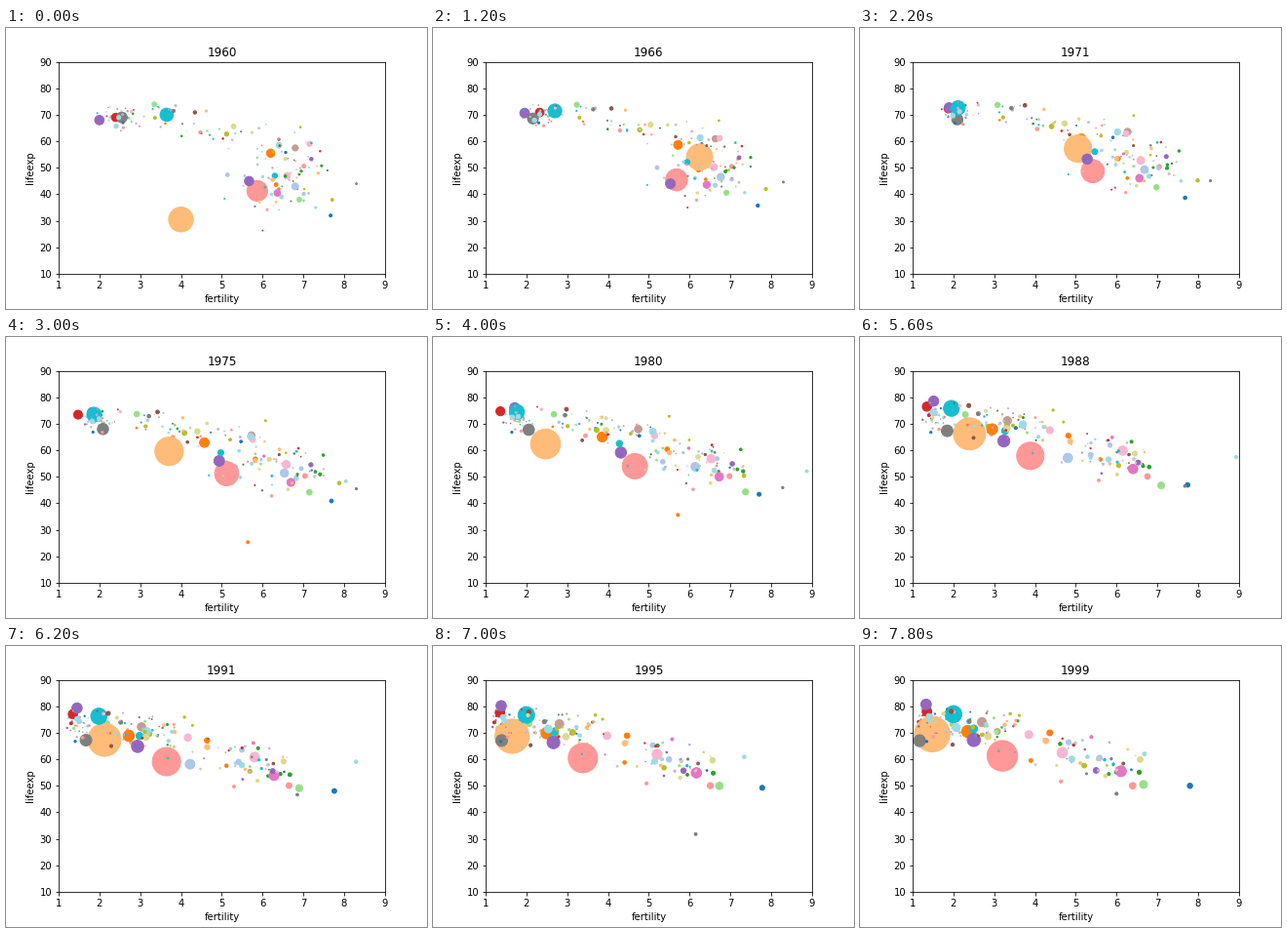
Write a matplotlib script that moves like this. It is 432 px wide and 288 px high and loops after 8000 ms.

```python
import numpy as np
import matplotlib.pyplot as plt
from matplotlib.animation import FuncAnimation

FIRST, LAST = 1960, 1999
YEARS = np.arange(FIRST, LAST + 1)
T = (YEARS - FIRST) / (LAST - FIRST)

(BLUE, LBLUE, ORANGE, LORANGE, GREEN, LGREEN, RED, LRED, PURPLE, LPURPLE,
 BROWN, LBROWN, PINK, LPINK, GRAY, LGRAY, OLIVE, LOLIVE, CYAN, LCYAN) = range(20)

rng = np.random.default_rng(5)
tracks = []  # (colour index, fertility, life expectancy, population in millions)


def bump(year, height, width):
    """A passing rise, or with a negative height a passing dip."""
    return height * np.exp(-((YEARS - year) / width) ** 2 / 2)


def s_curve(start, end, mid, pace):
    s = 1 / (1 + np.exp((mid - YEARS) / pace))
    return start + (end - start) * (s - s[0]) / (s[-1] - s[0])


def ease_out(start, end):
    return start + (end - start) * (1 - (1 - T) ** 1.4)


def country(color, pop, fert, mid, life, pace=8, fert_bump=0, life_bump=0):
    """Fertility falls around the year mid; fertile countries grow faster."""
    growth = 0.7 + 0.33 * np.mean(fert)
    tracks.append((color, s_curve(*fert, mid, pace) + fert_bump,
                   ease_out(*life) + life_bump, pop * growth ** T))


def small_pop(cap):
    return min(np.exp(rng.normal(0.5, 1.5)), cap)


def rich_countries(count):
    for _ in range(count):
        fert = max(rng.normal(2.5, 0.3), 1.95), max(rng.normal(1.5, 0.25), 1.15)
        life = rng.normal(69.5, 2.2), min(rng.normal(75, 3.5), 79)
        country(rng.integers(20), small_pop(50), fert, rng.uniform(1966, 1980), life)


def emerging_countries(count):
    for _ in range(count):
        start = rng.uniform(3.2, 7)
        fert = start, rng.uniform(1.7, 3.6)
        life = 75 - 3.4 * (start - 2) + rng.normal(0, 4), rng.normal(72, 3)
        country(rng.integers(20), small_pop(25), fert, rng.uniform(1972, 1986), life)


def poor_countries(count):
    for _ in range(count):
        end = rng.uniform(2.8, 6.6)
        fert = rng.normal(6.6, 0.55), end
        life = rng.normal(45, 7), 73 - 4.6 * (end - 2.5) + rng.normal(0, 5)
        country(rng.integers(20), small_pop(15), fert, rng.uniform(1982, 1994), life,
                pace=6, fert_bump=bump(1976, rng.normal(0.1, 0.4), 8))


rich_countries(20)
emerging_countries(22)
poor_countries(28)

# Afghanistan, Bangladesh, Brazil, Cambodia
country(BLUE, 9, (7.67, 7.8), 1990, (32, 50))
country(LBLUE, 50, (6.8, 3.2), 1988, (43, 60), pace=5)
country(ORANGE, 72, (6.2, 2.35), 1976, (55.5, 70.5))
country(ORANGE, 6, (6.4, 3.9), 1992, (42, 59.5), pace=4,
        fert_bump=bump(1977, -0.9, 3), life_bump=bump(1977, -34, 2.6))
# China
country(LORANGE, 645, (6.8, 1.46), 1973.5, (50, 69.5), pace=4,
        fert_bump=bump(1988, 0.8, 4) + bump(1960, -2.8, 1),
        life_bump=bump(1960, -19.5, 1.5))
# Ethiopia, Germany, India, Indonesia, Japan
country(LGREEN, 22, (6.9, 6.65), 1985, (38, 50.5),
        fert_bump=bump(1982, 0.6, 6), life_bump=bump(1984, -12, 2))
country(RED, 73, (2.4, 1.35), 1971, (69, 78), pace=2)
country(LRED, 450, (5.87, 3.2), 1982, (41.3, 61.3))
country(PURPLE, 90, (5.67, 2.5), 1982, (45, 67.3), pace=6,
        life_bump=bump(1965.5, -6, 1.5))
country(PURPLE, 93, (2.0, 1.33), 1983, (68, 80.7))
# Mexico, Nigeria, Pakistan, Philippines
country(LBROWN, 38, (6.8, 2.7), 1980, (57.5, 74), pace=5)
country(PINK, 45, (6.35, 6.1), 1990, (40.5, 55.5), fert_bump=bump(1979, 0.45, 7))
country(LPINK, 46, (6.6, 4.67), 1994, (47, 62.5), pace=4)
country(LPINK, 26, (7.15, 3.85), 1976, (59, 69.3))
# Russia, Rwanda, Turkey
country(GRAY, 120, (2.1, 1.17), 1993, (69, 67), pace=4, fert_bump=bump(1960, 0.45, 3))
country(GRAY, 3, (8.3, 6.0), 1990, (44, 47), pace=2, life_bump=bump(1994, -33, 0.8))
country(CYAN, 28, (6.3, 2.5), 1979, (47, 71.5))
# United States, Vietnam, Yemen
country(CYAN, 186, (3.65, 2.0), 1964, (70, 77), pace=3, fert_bump=bump(1979, -0.25, 5))
country(LCYAN, 33, (6.4, 2.07), 1987, (58.5, 72), pace=7)
country(LCYAN, 5, (7.3, 6.4), 1992, (35, 62), pace=4, fert_bump=bump(1985, 2.1, 7))

rich_countries(16)
emerging_countries(24)
poor_countries(34)

colors = plt.get_cmap("tab20")([track[0] for track in tracks])
fertility, life, population = (np.array([track[k] for track in tracks])
                               for k in (1, 2, 3))

fig = plt.figure(figsize=(6, 4), dpi=72, facecolor="white")
fig.subplots_adjust(left=0.125, right=0.9, bottom=0.125, top=0.88)
ax = fig.add_subplot()
dots = ax.scatter(fertility[:, 0], life[:, 0], s=population[:, 0], c=colors)
ax.set(xlim=(1, 9), ylim=(10, 90), xlabel="fertility", ylabel="lifeexp")
title = ax.set_title(str(FIRST))


def update(i):
    dots.set_offsets(np.column_stack([fertility[:, i], life[:, i]]))
    dots.set_sizes(population[:, i])
    title.set_text(str(YEARS[i]))
    return dots, title


anim = FuncAnimation(fig, update, frames=len(YEARS), interval=200,
                     repeat=True, repeat_delay=0)
plt.show()
```
